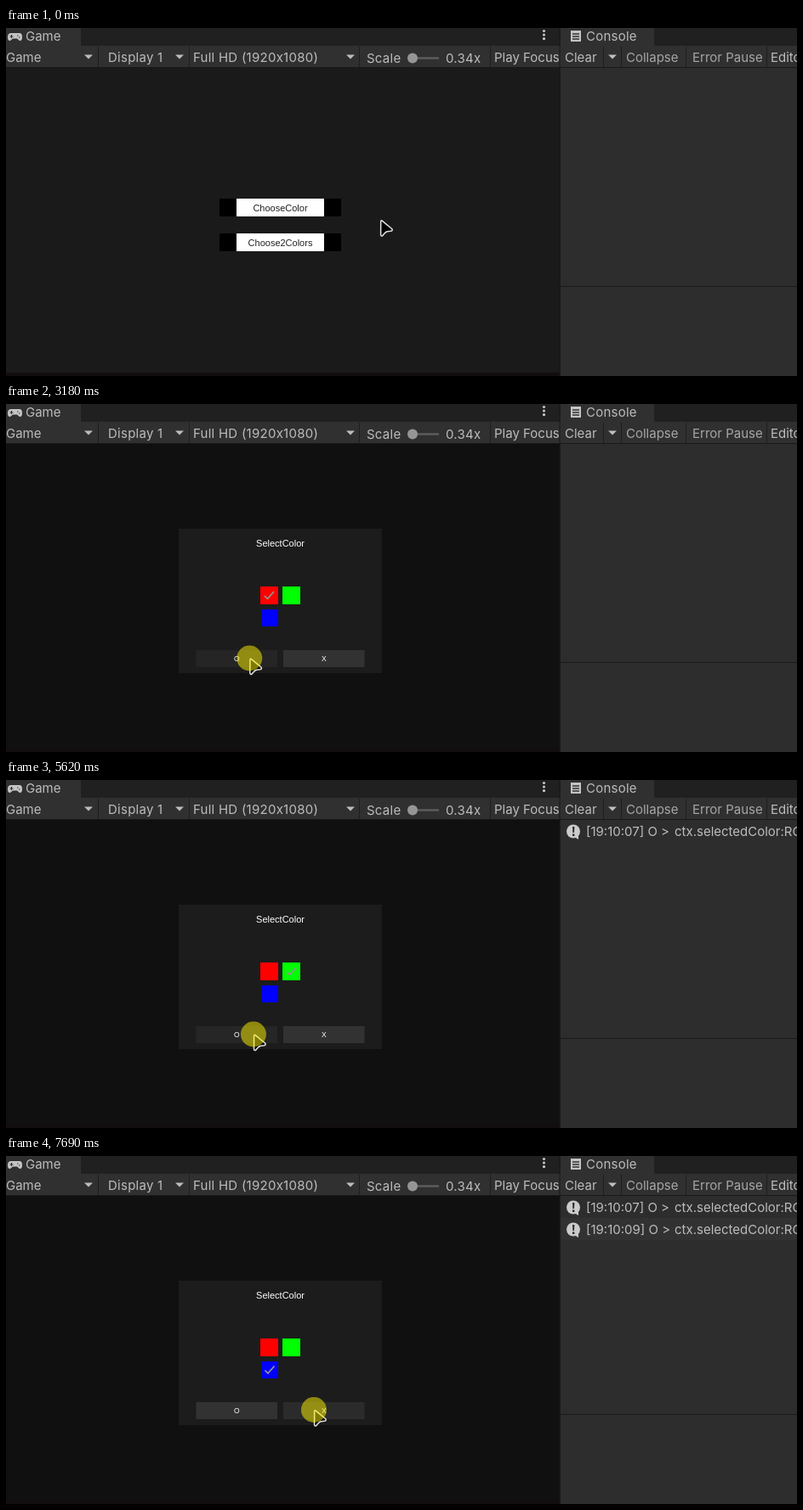
These frames come from a looping animation (930 px wide and 410 px high, 8 s). An HTML page:

```html
<!DOCTYPE html>
<html lang="en">
<head>
<meta charset="utf-8">
<title>Color dialog demo</title>
<style>
  html, body { margin: 0; width: 100%; height: 100%; overflow: hidden; background: #1a1a1a; }
  svg { display: block; width: 100vw; height: 100vh; }
  .ui { font: 15px Inter, sans-serif; fill: #bcbcbc; }
  .wide { letter-spacing: .25px; }
  .dim { fill: #a6a6a6; }
  .game { font: 11px "Liberation Sans", Arial, sans-serif; text-anchor: middle; }
  .small { font-size: 8.5px; }
  text { white-space: pre; }
</style>
</head>
<body>
<svg viewBox="0 0 930 410">
  <defs>
    <clipPath id="left"><rect width="650.5" height="410"/></clipPath>
    <path id="arrow" d="M-5-2.500H5L0 2.500Z" fill="#bcbcbc"/>
    <path id="line" d="M.5 22V46" stroke="#1e1e1e"/>
    <circle id="dot" cx="632.500" r="1.600" fill="#c4c4c4"/>
    <g id="info">
      <circle cx="667" cy="60.500" r="8" fill="#cbcbcb"/>
      <path d="M668 67l5 3v-6z" fill="#cbcbcb"/>
      <path d="M666 55h2.400l-.4 7h-1.600zM666 63.500h2.400v2.400h-2.400z" fill="#2b2b2b"/>
    </g>
  </defs>

  <!-- game view -->
  <rect id="view" width="651" height="410"/>
  <rect y="406" width="651" height="4" fill="#120d10"/>
  <g id="menu">
    <rect id="sides" x="251" y="201" width="143" height="21"/>
    <rect x="251" y="242" width="143" height="21"/>
    <rect id="choose" x="271" y="201" width="103" height="21"/>
    <rect x="271" y="242" width="103" height="21" fill="#fff"/>
    <g class="game" fill="#222">
      <text x="322.5" y="215.600">ChooseColor</text>
      <text x="322.5" y="256.600">Choose2Colors</text>
    </g>
  </g>
  <g id="dialog">
    <rect x="203" y="147" width="239" height="170" fill="#1c1c1c"/>
    <rect id="red" x="299" y="215" width="21" height="21" fill="#f00"/>
    <rect id="green" x="325" y="215" width="21" height="21" fill="#0f0"/>
    <rect id="blue" x="300" y="242" width="20" height="20" fill="#00f"/>
    <path id="check" d="M-5.500 .5L-2 4L5.500-4.500" fill="none" stroke="#949494" stroke-width="1.700"/>
    <rect id="ok" x="223.500" y="290" width="95.500" height="20"/>
    <rect id="cancel" x="326" y="290" width="95.500" height="20"/>
    <g class="game" fill="#fff">
      <text x="322.5" y="168">SelectColor</text>
      <text class="small" x="271.200" y="303">O</text>
      <text class="small" x="373.800" y="303">X</text>
    </g>
  </g>

  <!-- toolbars -->
  <rect width="930" height="21" fill="#202020"/>
  <rect width="88" height="21" fill="#303030"/>
  <rect y="21" width="930" height="25" fill="#303030"/>
  <g class="ui" clip-path="url(#left)">
    <text x="23" y="15">Game</text>
    <text x="0" y="40">Game</text>
    <text class="wide" x="120" y="40">Display 1</text>
    <text class="wide" x="220" y="40">Full HD (1920x1080)</text>
    <text class="wide" x="424" y="41">Scale</text>
    <text class="wide" x="517" y="41">0.34x</text>
    <text x="574" y="40">Play Focused</text>
  </g>
  <path d="M6 6h10q3 0 3 4.500q0 5-3 4.500l-3-2.500h-5l-3 2.500q-3 .5-3-4.500q0-4.500 4-4.500z" fill="#c4c4c4"/>
  <path d="M4.500 10h4M6.500 8v4M13 9h1.500M15 11h1.500" stroke="#303030" stroke-width="1.200"/>
  <use href="#dot" y="3.500"/><use href="#dot" y="8"/><use href="#dot" y="12.700"/>
  <path d="M483 35.500h26" stroke="#5c5c5c" stroke-width="2.500"/>
  <circle cx="478" cy="35.500" r="6" fill="#969696"/>

  <!-- console -->
  <rect x="652" y="47" width="278" height="363" fill="#2d2d2d"/>
  <rect x="652" width="110" height="21" fill="#303030"/>
  <path d="M664 3h12v13h-12z" fill="#c4c4c4"/>
  <path d="M666 7h8M666 10h8M666 13h8" stroke="#303030" stroke-width="1.300"/>
  <g class="ui">
    <text class="wide" x="682" y="15">Console</text>
    <text x="657" y="40">Clear</text>
    <text class="dim" x="729" y="40">Collapse</text>
    <text class="dim" x="807" y="40">Error Pause</text>
    <text x="899" y="40">Editor</text>
    <g class="log">
      <use href="#info"/>
      <text x="682" y="66">[19:10:07] O &gt;</text>
      <text x="786" y="66">ctx.selectedColor:RGBA(1.000, 0.000</text>
    </g>
    <g class="log">
      <rect x="652" y="73" width="278" height="26" fill="#323232"/>
      <use href="#info" y="26"/>
      <text x="682" y="92">[19:10:09] O &gt;</text>
      <text x="786" y="92">ctx.selectedColor:RGBA(0.000, 1.000</text>
    </g>
  </g>
  <path d="M0 46.500H930M651 0V410M652 304.500H930" fill="none" stroke="#191919"/>
  <use href="#line" x="108"/><use href="#line" x="215"/><use href="#line" x="415"/><use href="#line" x="569"/>
  <use href="#line" x="702"/><use href="#line" x="723"/><use href="#line" x="799"/><use href="#line" x="894"/>
  <use href="#arrow" x="97" y="34"/><use href="#arrow" x="204" y="34"/>
  <use href="#arrow" x="405" y="34"/><use href="#arrow" x="713" y="34"/>

  <path id="cursor" d="M.7 1.500Q1.200 .3 2.500 1.300L13.600 10.500Q15.300 12.700 12.500 13.300L8.500 13.700Q6.500 14 5 16L2.700 18.800Q.8 19.800 .6 17.500Z"
        stroke="#e2e2e2" stroke-width="1.500" stroke-linejoin="round"/>
  <circle id="press" r="15" fill="#fff500" fill-opacity=".5"/>
</svg>
<script>
const LOOP = 8000;
const HOME = [440, 226];
const PACE = 270;     // usual travel time
const SETTLE = 140;   // rest between arriving and pressing
const SHORT = .17;    // share of the sideways distance the pointer stops short
const FADE = 90;

const spots = {
  choose: [318, 216], red: [304.7, 224.5], green: [343.2, 226],
  blue: [307, 253], ok: [281.3, 299.5], cancel: [373, 299]
};

// target, press, release, travel time
const clicks = [
  ['choose', 470, 740], ['red', 1700, 2030], ['ok', 3090, 4100, 900],
  ['choose', 4500, 4700], ['green', 5190, 5270], ['ok', 5540, 5680],
  ['choose', 6540, 6650, 700], ['blue', 6950, 7150], ['cancel', 7640, LOOP]
].map(([target, press, release, pace = PACE]) => ({ target, press, release, pace }));

const $ = id => document.getElementById(id);
const logs = document.querySelectorAll('.log');
const clamp01 = v => Math.min(1, Math.max(0, v));
const easeOut = f => 1 - (1 - f) ** 3;
const mix = (a, b, f) => a + (b - a) * f;
const show = (el, on) => el.setAttribute('display', on ? 'inline' : 'none');
const place = (el, x, y) => el.setAttribute('transform', `translate(${x} ${y})`);
const fill = (el, color) => el.setAttribute('fill', color);

function pointer(t) {
  let [x, y] = HOME, free = 0;
  for (const { target, press, release, pace } of clicks) {
    const arrive = press - SETTLE;
    const leave = Math.max(free, arrive - pace);
    if (t < leave) break;
    const f = easeOut(clamp01((t - leave) / (arrive - leave)));
    const [goalX, goalY] = spots[target];
    x = mix(x, mix(goalX, x, SHORT), f);
    y = mix(y, goalY, f);
    free = release;
  }
  return [x, y];
}

// Replays every finished click
function stateAt(t) {
  const state = { open: false, mark: null, color: '#000', logged: 0 };
  for (const { target } of clicks.filter(c => c.release <= t)) {
    if (target === 'choose') Object.assign(state, { open: true, mark: null });
    else if (target === 'ok') {
      state.open = false;
      state.color = $(state.mark).getAttribute('fill');
      state.logged++;
    } else state.mark = target;
  }
  return state;
}

function tint(id, t, held, normal, pressed) {
  const f = held && held.target === id ? clamp01((t - held.press) / FADE) : 0;
  const v = Math.round(mix(normal, pressed, f));
  fill($(id), `rgb(${v},${v},${v})`);
}

function draw(t) {
  const { open, mark, color, logged } = stateAt(t);
  const held = clicks.find(c => t >= c.press && t < c.release);

  show($('dialog'), open);
  show($('menu'), !open);
  fill($('view'), open ? '#101010' : '#1a1a1a');
  fill($('sides'), color);
  tint('choose', t, held, 255, 200);
  tint('ok', t, held, 50, 37);
  tint('cancel', t, held, 50, 37);
  logs.forEach((log, i) => show(log, i < logged));

  show($('check'), mark);
  if (mark) {
    const box = $(mark);
    const middle = (edge, size) => +box.getAttribute(edge) + box.getAttribute(size) / 2;
    place($('check'), middle('x', 'width'), middle('y', 'height'));
  }

  const [x, y] = pointer(t);
  place($('cursor'), x, y);
  place($('press'), x, y);
  show($('press'), held);
}

const start = performance.now();
function frame() {
  draw((performance.now() - start) % LOOP);
  requestAnimationFrame(frame);
}
frame();
</script>
</body>
</html>
```
